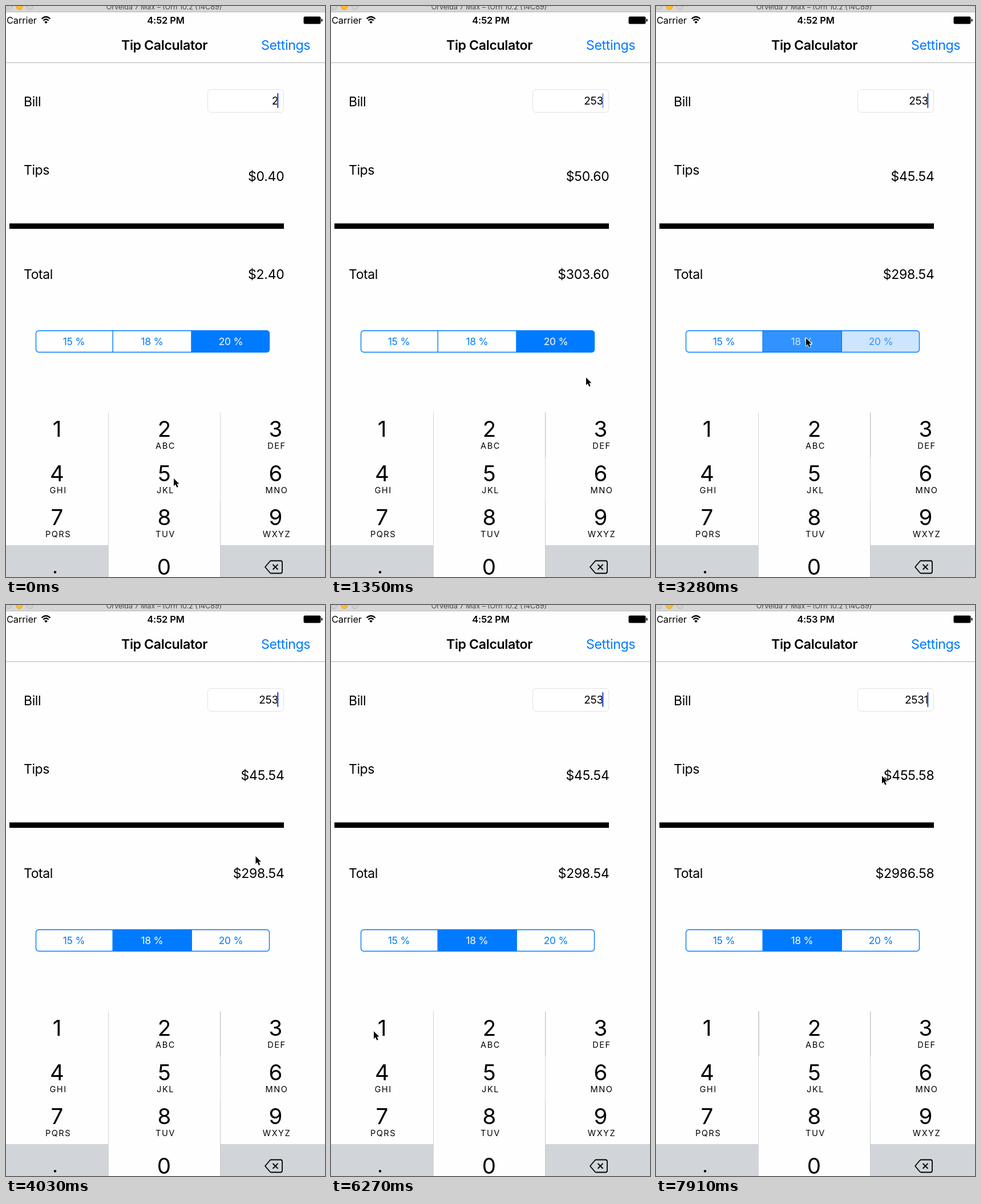
These frames come from a looping animation (559 by 1002 pixels, 8 s). An HTML page:

```html
<!DOCTYPE html>
<html lang="en">
<head>
<meta charset="utf-8">
<title>Tip Calculator</title>
<style>
html, body { margin: 0; width: 100%; height: 100%; overflow: hidden; background: #fefefe; }
svg { display: block; width: 559px; height: 1002px; font-family: Inter, "Liberation Sans", sans-serif; }
.body { font-size: 23px; letter-spacing: -.4px; }
.money { font-size: 23px; letter-spacing: -.25px; text-anchor: end; }
.bill { font-size: 19px; letter-spacing: -.3px; text-anchor: end; }
.nav { font-size: 23.2px; letter-spacing: -.4px; }
.status { font-size: 16.4px; letter-spacing: -.1px; }
.bold { font-weight: 600; }
.mid { text-anchor: middle; }
.seg { font-size: 17.4px; letter-spacing: -.2px; text-anchor: middle; }
.digit { font-size: 38.5px; text-anchor: middle; }
.letters { font-size: 14.6px; letter-spacing: 1.5px; text-anchor: middle; }
</style>
</head>
<body>
<svg viewBox="0 0 559 1002" xmlns="http://www.w3.org/2000/svg">
  <rect width="559" height="1002" fill="#fefefe"/>

  <!-- window title bar -->
  <rect width="559" height="10" fill="#d6d6d6"/>
  <rect y="10" width="559" height="1" fill="#b9b9b9"/>
  <g stroke-width="1">
    <circle cx="5" cy="1" r="5.5" fill="#d0d0d0" stroke="#b8b8b8"/>
    <circle cx="23.500" cy="1" r="5.500" fill="#fdbc2e" stroke="#dfa023"/>
    <circle cx="42" cy="1" r="5.500" fill="#d0d0d0" stroke="#b8b8b8"/>
  </g>
  <text class="mid" x="277" y="6" font-size="12.500" fill="#4a4a4a">Orvelda 7 Max – tOrn 10.2 (14C89)</text>

  <!-- status bar -->
  <text class="status" x="1" y="31">Carrier</text>
  <g fill="none" stroke="#000" stroke-width="2.300">
    <path d="M62.500 22.500Q70 15.500 77.500 22.500M65.300 25.500Q70 21 74.700 25.500"/>
    <path d="M70 31L67.200 28Q70 25.600 72.800 28Z" fill="#000" stroke="none"/>
  </g>
  <text class="status bold mid" id="clock" x="280" y="31"></text>
  <rect x="521.500" y="18.500" width="30" height="13" rx="2.500"/>
  <rect x="552.500" y="22.500" width="2" height="5" rx="1"/>

  <!-- navigation bar -->
  <text class="nav bold mid" x="277.500" y="77">Tip Calculator</text>
  <text class="nav" x="447" y="77" fill="#007aff">Settings</text>
  <rect y="99" width="559" height="1" fill="#b4b4b4"/>

  <!-- form -->
  <g class="body">
    <text x="31" y="176">Bill</text>
    <text x="31" y="296">Tips</text>
    <text x="31" y="479">Total</text>
  </g>
  <rect x="353.500" y="146.500" width="133" height="40" rx="5.500" fill="#fff" stroke="#e2e2e2"/>
  <text class="bill" id="bill" x="477" y="173"></text>
  <rect id="caret" x="475" y="153" width="2.500" height="26" rx="1" fill="#3d63d8"/>
  <text class="money" id="tips" x="487.500" y="307"></text>
  <rect x="6" y="381.500" width="481" height="9.500"/>
  <text class="money" id="total" x="487.500" y="479"></text>

  <!-- segmented control -->
  <clipPath id="round"><rect x="52" y="569" width="410" height="39" rx="5.500"/></clipPath>
  <g clip-path="url(#round)" fill="#007aff">
    <rect id="fill18" x="187" y="569" width="138.500" height="39"/>
    <rect id="fill20" x="324.500" y="569" width="138" height="39"/>
    <rect x="186.500" y="569" width="1.400" height="39"/>
    <rect x="324.500" y="569" width="1.400" height="39"/>
  </g>
  <rect x="52.500" y="569.700" width="409" height="37.800" rx="5" fill="none" stroke="#007aff" stroke-width="1.400"/>
  <g class="seg">
    <text x="119" y="595" fill="#007aff">15 %</text>
    <text id="text18" x="256" y="595">18 %</text>
    <text id="text20" x="394" y="595">20 %</text>
  </g>

  <!-- keypad -->
  <rect id="press" y="713" width="180" height="78" fill="#d1d5da"/>
  <path d="M0 946H180V1002H0ZM376 946H559V1002H376Z" fill="#d1d5da"/>
  <path d="M179.500 713V1002M375.500 713V1002" stroke="#d6d6d8" fill="none"/>
  <path d="M375.500 869V1002" stroke="#c9cacd"/>
  <path id="edge1" d="M180 713V792" stroke="#c8c9cc" stroke-width="1.500"/>
  <path id="edge3" d="M375.700 713V792" stroke="#c8c9cc" stroke-width="1.500"/>
  <g id="keys"></g>
  <circle cx="86" cy="993.500" r="2.200"/>
  <g fill="none" stroke="#000" stroke-width="1.800" stroke-linejoin="round">
    <path d="M454 984.500L462.500 974.500Q463.300 973.500 464.500 973.500H481Q484 973.500 484 976.500V992.500Q484 995.500 481 995.500H464.500Q463.300 995.500 462.500 994.500Z"/>
    <path d="M467.500 980L476.500 989M476.500 980L467.500 989"/>
  </g>

  <path id="pointer" d="M0 0V13.200L3 10.400L5.300 15.800L7.700 14.800L5.400 9.500H9.500Z" stroke="#fff" stroke-width="1.600" paint-order="stroke"/>
</svg>
<script>
const LOOP = 8000, STEP = 149.05;
const $ = id => document.getElementById(id);

const letters = ["", "ABC", "DEF", "GHI", "JKL", "MNO", "PQRS", "TUV", "WXYZ"];
const cols = [89.5, 277.5, 472.5];
const key = (label, x, y) => `<text class="digit" x="${x}" y="${y}">${label}</text>`;
$("keys").innerHTML = letters.map((word, i) => {
  const x = cols[i % 3], y = 756 + Math.floor(i / 3) * 77.6;
  return key(i + 1, x, y) + `<text class="letters" x="${x + 2}" y="${y + 21}">${word}</text>`;
}).join("") + key(0, 277, 998);

// pointer path: step, x, y
const path = [
  [0, 294, 829], [1, 290, 829], [3, 292, 828], [4, 350, 790], [5, 430, 748],
  [6, 463, 737], [8, 462, 736], [9, 447, 652], [10, 390, 612], [11, 310, 592],
  [12, 270, 585], [13, 263, 583], [24, 263, 583], [26, 375, 490], [28, 500, 392],
  [29, 519, 355], [31, 472, 336], [33, 412, 343], [34, 406, 345], [35, 396, 375],
  [37, 275, 620], [38, 195, 770], [39, 140, 847], [40, 128, 842], [41, 92, 775],
  [42, 75, 748], [44, 75, 747], [46, 75, 747], [48, 190, 570], [50, 400, 350],
  [51, 466, 296], [52, 447, 290], [53, 396, 300]
];

function pointerAt(n) {
  const i = Math.max(1, path.findIndex(p => p[0] >= n));
  const [a, ax, ay] = path[i - 1], [b, bx, by] = path[i];
  const k = (n - a) / (b - a);
  return [ax + (bx - ax) * k, ay + (by - ay) * k];
}

const clamp = v => Math.min(1, Math.max(0, v));

// blink restarts after each typed digit
function caretAt(t) {
  const start = t < 6400 ? 1340 : 6970;
  if (t < start - 150) return 1;
  const p = ((t - start + 1000) % 1000) / 1000;
  return p < .5 ? clamp(.55 - p * 7) : clamp((p - .45) * 5);
}

const mix = (a, b, k) => `rgb(${a.map((v, i) => Math.round(v + (b[i] - v) * k))})`;
const blue = [0, 122, 255], white = [255, 255, 255];

function draw(now) {
  const t = now % LOOP, n = Math.min(53, Math.floor(t / STEP));
  const bill = n < 2 ? 2 : n < 6 ? 25 : n < 44 ? 253 : 2531;
  const tip = bill * (n < 22 ? .2 : .18);
  const sel = n < 22 ? 0 : n < 23 ? .81 : 1;

  $("bill").textContent = bill;
  $("tips").textContent = "$" + tip.toFixed(2);
  $("total").textContent = "$" + (bill + tip).toFixed(2);
  $("clock").textContent = n < 48 ? "4:52 PM" : "4:53 PM";
  $("caret").style.opacity = caretAt(n * STEP);

  $("fill18").style.opacity = sel;
  $("fill20").style.opacity = 1 - sel;
  $("text18").style.fill = mix(blue, white, sel);
  $("text20").style.fill = mix(white, blue, sel);

  $("press").style.opacity = n === 43 ? 1 : 0;
  $("edge1").style.opacity = n > 43 ? 1 : 0;
  $("edge3").style.opacity = n > 5 ? 1 : 0;
  $("pointer").setAttribute("transform", `translate(${pointerAt(n)})`);
  requestAnimationFrame(() => draw(performance.now() - begin));
}
const begin = performance.now();
draw(0);
</script>
</body>
</html>
```
